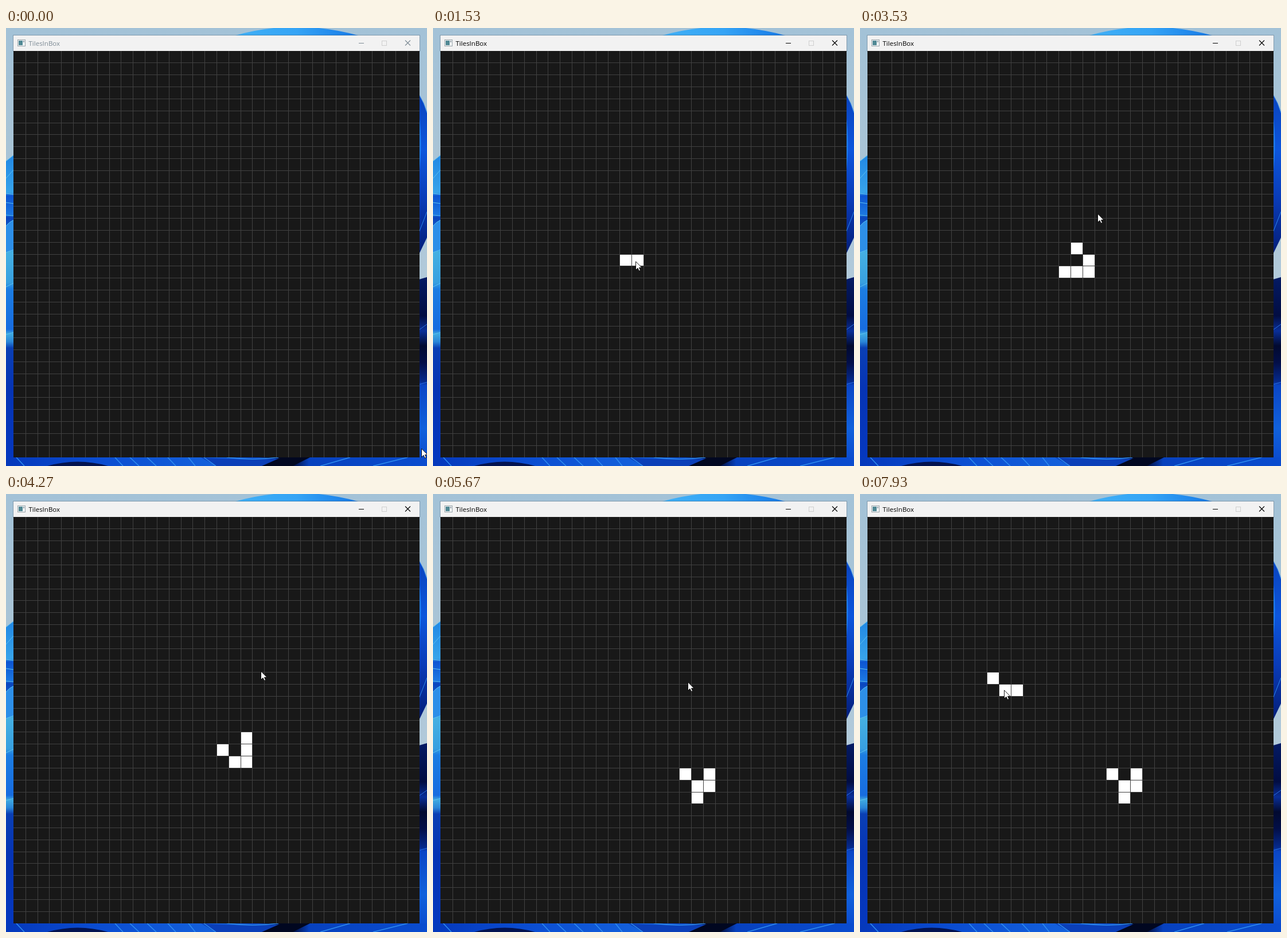
Animation of 734 by 763 pixels, one loop 8 s. Source, as an HTML page with a canvas:

```html
<!DOCTYPE html>
<html lang="en">
<head>
<meta charset="utf-8">
<title>Cell grid</title>
<style>
  html, body { margin: 0; width: 100%; height: 100%; overflow: hidden; background: #a6c3d8; }
  #stage { position: absolute; left: 0; top: 0; width: 734px; height: 763px; overflow: hidden; }
  #stage > svg, #board { position: absolute; display: block; }
  #wall { left: 0; top: 0; }
  #bar {
    position: absolute; left: 13px; top: 13px; width: 708px; height: 27px;
    background: #f2f2f2; color: #7d8b95;
    box-shadow: 0 0 0 1px rgba(70, 90, 110, .4);
  }
  #bar.on { color: #000; }
  #bar span {
    position: absolute; left: 26.5px; top: 0; line-height: 27px; white-space: nowrap;
    font: 11.5px/27px "Open Sans", "Noto Sans", sans-serif;
  }
  #bar svg { position: absolute; left: 0; top: 0; }
  #board { left: 13px; top: 40px; }
  #mouse { left: 0; top: 0; overflow: visible; }
</style>
</head>
<body>
<div id="stage">
  <svg id="wall" width="734" height="763">
    <defs>
      <linearGradient id="sky" x2="0" y2="1">
        <stop offset="0" stop-color="#a3c2d7"/><stop offset=".3" stop-color="#a9c4d6"/><stop offset="1" stop-color="#bed2e0"/>
      </linearGradient>
      <linearGradient id="top" x2="1">
        <stop offset="0" stop-color="#3fb0f6"/><stop offset=".5" stop-color="#35a4f5"/><stop offset="1" stop-color="#1477e6"/>
      </linearGradient>
      <linearGradient id="left" gradientUnits="userSpaceOnUse" x1="0" y1="222" x2="0" y2="763">
        <stop offset="0" stop-color="#2288e4"/><stop offset=".12" stop-color="#38a4ea"/>
        <stop offset=".13" stop-color="#0d55d2"/><stop offset=".19" stop-color="#1c78e2"/>
        <stop offset=".2" stop-color="#0a45bd"/><stop offset=".3" stop-color="#2384e4"/>
        <stop offset=".31" stop-color="#45b0e2"/><stop offset=".41" stop-color="#38a0e0"/>
        <stop offset=".43" stop-color="#1c7de2"/><stop offset=".56" stop-color="#176ce0"/>
        <stop offset=".575" stop-color="#3fa9e0"/><stop offset=".6" stop-color="#2a86d8"/>
        <stop offset=".62" stop-color="#0a3fb4"/><stop offset=".75" stop-color="#0634b4"/><stop offset="1" stop-color="#0538c0"/>
      </linearGradient>
      <linearGradient id="right" x2="0" y2="1">
        <stop offset="0" stop-color="#0a43bd"/><stop offset=".35" stop-color="#0d56dc"/>
        <stop offset=".65" stop-color="#0a3cb8"/><stop offset="1" stop-color="#041e78"/>
      </linearGradient>
      <linearGradient id="low" gradientUnits="userSpaceOnUse" x1="0" y1="436" x2="0" y2="763">
        <stop offset="0" stop-color="#041a63"/><stop offset=".2" stop-color="#020d42"/>
        <stop offset=".28" stop-color="#0a2f98"/><stop offset=".36" stop-color="#020a30"/>
        <stop offset=".45" stop-color="#030f48"/><stop offset=".55" stop-color="#062a8c"/>
        <stop offset=".57" stop-color="#0b46c6"/><stop offset=".8" stop-color="#1161dc"/><stop offset="1" stop-color="#0a48cc"/>
      </linearGradient>
      <linearGradient id="base" x2="1">
        <stop offset="0" stop-color="#0538bb"/><stop offset=".2" stop-color="#0a4bd0"/>
        <stop offset=".5" stop-color="#1461dc"/><stop offset=".6" stop-color="#0b46c2"/>
        <stop offset=".64" stop-color="#01061c"/><stop offset=".68" stop-color="#020c38"/>
        <stop offset=".72" stop-color="#0741be"/><stop offset="1" stop-color="#0a4ccf"/>
      </linearGradient>
    </defs>
    <rect width="734" height="763" fill="url(#sky)"/>
    <path d="M396 14Q505-18 618 14Z" fill="url(#top)"/>
    <path d="M0 232L14 221V763H0Z" fill="url(#left)"/>
    <path d="M0 345Q5 338 14 334V386L0 391Z" fill="#2d8fe8"/>
    <g fill="none" stroke="#5cc0ee">
      <path d="M0 232L14 221M0 262L14 246M0 288L14 290M0 304L14 306M0 326L14 327M0 391L14 386M0 451L14 444M0 534L14 530"/>
      <path d="M0 345Q5 338 14 334"/>
    </g>
    <path d="M720 116Q729 130 734 148V365L720 394Z" fill="url(#right)"/>
    <path d="M720 150Q727 200 720 256Z" fill="#1f7cec"/>
    <path d="M720 116Q729 130 734 148M720 356L734 320" fill="none" stroke="#2d86ec"/>
    <path d="M720 438L734 434V763H720Z" fill="url(#low)"/>
    <path d="M720 526L734 516M720 621L734 617" stroke="#2a6fe0"/>
    <path d="M0 748H734V763H0Z" fill="url(#base)"/>
    <path d="M72 763Q125 748 178 763Z" fill="#031350"/>
    <path d="M340 748Q430 754 500 748L470 763H366Z" fill="#0b3fb8"/>
    <path d="M480 748H530L500 763H446Z" fill="#010720"/>
    <path d="M18 748L32 763M190 748L204 763M216 748L232 763M246 748L262 763M282 748L296 763M318 748L330 763M345 748L366 763M548 763L600 748M640 763L700 748M385 748Q430 754 475 748" fill="none" stroke="#2f8dee" stroke-width="1.5"/>
  </svg>

  <div id="bar">
    <svg width="708" height="27" fill="none">
      <rect x="7.5" y="7.5" width="13" height="11" fill="#f7f9fa" stroke="#98a2a8"/>
      <rect x="9" y="9" width="7" height="8" fill="#4f8793"/>
      <rect x="17" y="9" width="2" height="3" fill="#9aa6ad"/>
      <path d="M602 13.5H611" stroke="currentColor"/>
      <rect x="642.5" y="9.5" width="8" height="8" stroke="#cfcfcf"/>
      <path d="M683 8.5L692 17.5M692 8.5L683 17.5" stroke="currentColor" stroke-width="1.1"/>
    </svg>
    <span>TilesInBox</span>
  </div>

  <canvas id="board" width="708" height="708"></canvas>

  <svg id="mouse" width="12" height="18">
    <path d="M.5.8V15.6L4 12.3L6.2 17.2L8.6 16.2L6.5 11.4H11Z" fill="#fff" stroke="#000" stroke-width=".9"/>
  </svg>
</div>

<script>
const LOOP = 8000, STEP = 1000 / 15, N = 34, SIZE = 708 / N;
const bar = document.getElementById('bar');
const mouse = document.getElementById('mouse');
const ctx = document.getElementById('board').getContext('2d');

// time, column, row
const drawn = [[1200, 15, 17], [1530, 16, 17], [1870, 17, 17], [2070, 17, 16], [2330, 16, 15]];
const added = [[7270, 12, 14], [7600, 10, 13], [7930, 11, 14]];
const FOCUS = 1200, RUN = 3070;

// time, x, y of the pointer tip
const route = [
  [0, 724, 732], [870, 333, 406], [930, 331, 406], [1270, 331, 406], [1530, 353, 406],
  [1670, 358, 406], [1800, 377, 404], [1930, 377, 402], [2070, 376, 384], [2270, 355, 367],
  [2330, 355, 366], [3000, 355, 366], [3800, 434, 309], [4130, 443, 308], [4270, 444, 308],
  [5400, 444, 308], [5600, 444, 327], [5730, 444, 327], [6130, 239, 371], [6270, 250, 370],
  [6730, 262, 361], [7070, 262, 361], [7270, 275, 342], [7600, 226, 318], [7670, 225, 318],
  [7870, 244, 357], [7930, 251, 341], [8000, 251, 341]
];

const key = (x, y) => y * N + x;

function evolve(live) {
  const count = new Map();
  for (const k of live)
    for (let dy = -1; dy < 2; dy++)
      for (let dx = -1; dx < 2; dx++)
        if (dx || dy) {
          const n = k + key(dx, dy);
          count.set(n, (count.get(n) || 0) + 1);
        }
  return [...count].filter(([k, n]) => n === 3 || n === 2 && live.includes(k)).map(([k]) => k);
}

const clicked = (list, t) => list.filter(c => t >= c[0]).map(c => key(c[1], c[2]));
const history = [clicked(drawn, LOOP)];
for (let i = 0; i < 21; i++) history.push(evolve(history[i]));

function generation(t) {
  if (t < 4270) return 1 + Math.floor((t - RUN) / (400 / 3));
  if (t < 5070) return 10 + Math.floor((t - 4270) / 100);
  return Math.min(21, 18 + Math.floor((t - 5070) / (400 / 3)));
}

function pointer(t) {
  const i = Math.max(1, route.findIndex(p => p[0] > t));
  const [t0, x0, y0] = route[i - 1], [t1, x1, y1] = route[i];
  let u = (t - t0) / (t1 - t0);
  if (t1 - t0 > 350) u = u * u * (3 - 2 * u);
  return [x0 + (x1 - x0) * u, y0 + (y1 - y0) * u].map(Math.round);
}

const col = k => Math.round(k * SIZE);
const row = k => Math.round(k * SIZE - .4);

function paintBoard(live) {
  ctx.fillStyle = '#181818';
  ctx.fillRect(0, 0, 708, 708);
  ctx.fillStyle = '#fff';
  for (const k of live) {
    const x = k % N, y = Math.floor(k / N);
    ctx.fillRect(col(x), row(y), col(x + 1) - col(x), row(y + 1) - row(y));
  }
  ctx.fillStyle = '#414141';
  for (let i = 1; i < N; i++) {
    ctx.fillRect(col(i), 0, 1, 708);
    ctx.fillRect(0, row(i), 708, 1);
  }
}

function render(now) {
  const t = Math.floor((now % LOOP + 4) / STEP) * STEP % LOOP + 4;
  paintBoard(t < RUN ? clicked(drawn, t) : history[generation(t)].concat(clicked(added, t)));
  bar.classList.toggle('on', t >= FOCUS);
  const [x, y] = pointer(t);
  mouse.style.transform = `translate(${x}px, ${y}px)`;
}

const start = performance.now();
function tick() {
  render(performance.now() - start);
  requestAnimationFrame(tick);
}
tick();
</script>
</body>
</html>
```
